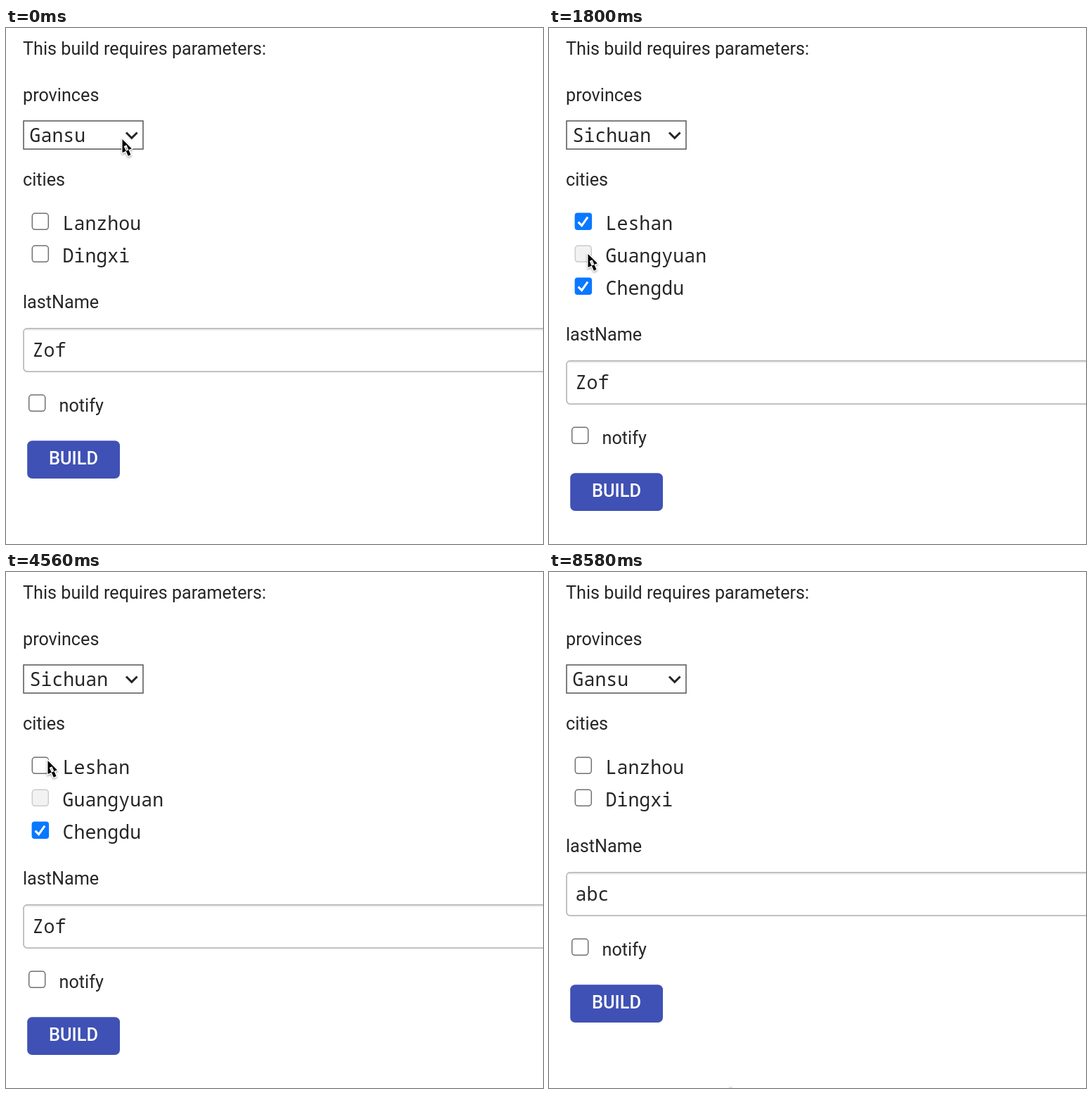
Write an HTML page with a canvas that moves like this. It is 764x733 px and loops after 8640 ms.

```html
<!DOCTYPE html>
<html lang="en">
<head>
<meta charset="utf-8">
<title>Build parameters</title>
<style>
  html, body { margin: 0; width: 100%; height: 100%; overflow: hidden; background: #fff; }
  canvas { display: block; }
</style>
</head>
<body>
<canvas id="stage" width="764" height="733"></canvas>
<script>
const canvas = document.getElementById('stage');
const ctx = canvas.getContext('2d');
const LOOP = 8640, STEP = 60, ROW = 46, ITEM = 41;
const LABEL = '25.2px Roboto, sans-serif';
const MONO = '26.6px "Noto Sans Mono", monospace';
const MENU = '24.4px Inter, sans-serif';
const INK = '#262626', PALE = '#f3f3f3';
const PROVINCES = ['Gansu', 'Sichuan', 'Disabled'];

// Moments of the story, in ms
const openFirst = 60, pickSichuan = 780, citiesLoaded = 1260, uncheck = 2940;
const openSecond = 3540, pickGansu = 4440, citiesBack = 4680;
const focusField = 6300, selectWord = 6420, typing = 6720, blurField = 7860;

const within = (t, a, b) => t >= a && t < b;
const clamp = (v, lo = 0, hi = 1) => Math.max(lo, Math.min(hi, v));
const ease = u => u * u * (3 - 2 * u);

function pointerAt(t) {
  let x = 165, y = 157;
  const glide = (start, end, toX, toY) => {
    const k = ease(clamp((t - start) / (end - start)));
    x += (toX - x) * k;
    y += (toY - y) * k;
  };
  glide(openFirst, 480, 100, 198);
  glide(pickSichuan, 960, 103, 241);
  glide(960, 1500, 164, 148);
  glide(1500, 1800, 55, 320);
  glide(2100, 2400, 48, 362);
  glide(2580, 2880, 52, 274);
  glide(3060, 3360, 172, 152);
  glide(openSecond, 4020, 91, 135);
  glide(4020, 4260, 72, 113);
  glide(4380, 4560, 59, 267);
  glide(4620, 5280, 84, 330);
  glide(5340, 6000, 82, 408);
  glide(6000, 6180, 82, 443);
  glide(7200, 7740, 630, 590);
  glide(7980, 8580, 258, 731);
  return [x, y];
}

function text(str, x, y, font = LABEL, color = INK) {
  ctx.font = font;
  ctx.fillStyle = color;
  ctx.fillText(str, x, y);
}

function box(x, y, w, h, r, fill, stroke, line = 1.5) {
  ctx.beginPath();
  ctx.roundRect(x, y, w, h, r);
  if (fill) { ctx.fillStyle = fill; ctx.fill(); }
  if (stroke) { ctx.strokeStyle = stroke; ctx.lineWidth = line; ctx.stroke(); }
}

// A "v" stroke with its point at x, y and arms of the given widths
function vee(x, y, left, right, slope, color, width) {
  ctx.beginPath();
  ctx.moveTo(x - left, y - left);
  ctx.lineTo(x, y);
  ctx.lineTo(x + right, y - right * slope);
  ctx.strokeStyle = color;
  ctx.lineWidth = width;
  ctx.stroke();
}

const tick = (x, y, size, color, width) => vee(x, y, size, size * 1.7, 1.4, color, width);

function checkbox(x, y, state = 'off') {
  if (state === 'on') {
    box(x, y, 24.5, 24.5, 4, '#0a78ff');
    tick(x + 10, y + 18, 5, '#fff', 3);
  } else {
    const disabled = state === 'disabled';
    box(x + .7, y + .7, 23, 23, 4, disabled ? '#f2f2f2' : '#fff', disabled ? '#cbcbcb' : '#707070');
  }
}

function select(value, busy) {
  if (busy) box(26, 133, 168, 38, 4, '#fff', '#b9b9b9', 3);
  else box(25, 132, 170, 40, 0, '#fff', '#555');
  text(value, 33.5, 162, MONO);
  vee(178.8, 156.3, 7.8, 7.8, 1, INK, 3);
}

function textField(y, value, focused, selected) {
  box(25, y, 780, 61.3, 5, '#fff', focused ? '#66afe9' : '#b8b8b8', 1.7);
  ctx.fillStyle = 'rgba(0,0,0,.07)';
  ctx.fillRect(28, y + 1, 740, 2);
  ctx.font = MONO;
  const width = ctx.measureText(value).width;
  if (selected) {
    ctx.fillStyle = '#b3d7ff';
    ctx.fillRect(37.5, y + 14, width, 33);
  }
  text(value, 37.5, y + 40, MONO);
  if (focused && !selected) {
    ctx.fillStyle = INK;
    ctx.fillRect(38.5 + width, y + 15, 1.6, 31);
  }
}

// The pop-up opens with its checked item over the select box
function menu(checked, pointerY, flash) {
  const top = 124 - ITEM * checked;
  const hover = clamp(Math.floor((pointerY - top - 9) / ITEM), 0, 2);
  ctx.save();
  ctx.shadowColor = 'rgba(0,0,0,.32)';
  ctx.shadowBlur = 30;
  ctx.shadowOffsetY = 7;
  box(10, top, 176, 140.5, 9, '#5b5b5b');
  ctx.restore();
  box(10.5, top + .5, 175, 139.5, 9, null, '#3e3e3e', 1);
  box(11.7, top + 1.7, 172.6, 137, 8, null, '#717171', 1);
  if (!flash) box(18, top + 8.5 + ITEM * hover, 159.5, 41.5, 5, '#7d7d7d');
  PROVINCES.forEach((name, i) =>
    text(name, 47.5, top + 39 + ITEM * i, MENU, name === 'Disabled' ? '#989898' : PALE));
  tick(31.5, top + 38 + ITEM * checked, 4.5, PALE, 2.2);
}

function arrow(x, y) {
  const length = 19, width = length * .7;
  const shape = new Path2D();
  shape.moveTo(0, 0);
  shape.lineTo(0, length);
  shape.lineTo(width, width);
  shape.closePath();
  const tail = new Path2D();
  tail.rect(-2, 10, 4, 15);
  shape.addPath(tail, new DOMMatrix().rotate(-24));

  ctx.save();
  ctx.translate(x + .5, y + 1);
  ctx.shadowColor = 'rgba(0,0,0,.35)';
  ctx.shadowBlur = 3;
  ctx.shadowOffsetY = 1.5;
  ctx.strokeStyle = '#fff';
  ctx.lineWidth = 2.6;
  ctx.stroke(shape);
  ctx.shadowColor = 'transparent';
  ctx.fillStyle = '#000';
  ctx.fill(shape);
  ctx.restore();
}

function iBeam(x, y) {
  ctx.beginPath();
  for (const end of [-1, 1]) {
    for (const side of [-1, 1]) {
      ctx.moveTo(x + side * 5, y + end * 12);
      ctx.quadraticCurveTo(x, y + end * 12, x, y + end * 9);
    }
  }
  ctx.moveTo(x, y - 9);
  ctx.lineTo(x, y + 9);
  ctx.moveTo(x - 3, y + 3);
  ctx.lineTo(x + 3, y + 3);
  for (const [color, width] of [['#fff', 4], ['#111', 1.8]]) {
    ctx.strokeStyle = color;
    ctx.lineWidth = width;
    ctx.stroke();
  }
}

function fieldValue(t) {
  const typed = Math.floor((t - typing) / 180) + 1;
  return typed > 0 ? 'abc'.slice(0, typed) : 'Zof';
}

function form(t) {
  const sichuan = within(t, citiesLoaded, citiesBack);
  const cities = sichuan ? ['Leshan', 'Guangyuan', 'Chengdu'] : ['Lanzhou', 'Dingxi'];
  const marks = sichuan ? [t < uncheck ? 'on' : 'off', 'disabled', 'on'] : [];
  const shift = ROW * (cities.length - 2);

  text('This build requires parameters:', 24, 38);
  text('provinces', 24, 104);
  select(PROVINCES[+within(t, pickSichuan, citiesBack)], within(t, pickSichuan, citiesLoaded));
  text('cities', 24, 224);
  cities.forEach((city, i) => {
    checkbox(36.6, 262.6 + ROW * i, marks[i]);
    text(city, 80.5, 287 + ROW * i, MONO);
  });

  ctx.save();
  ctx.translate(0, shift);
  text('lastName', 24, 398);
  textField(426.8, fieldValue(t), within(t, focusField, blurField), within(t, selectWord, typing));
  checkbox(32, 520.6);
  text('notify', 75.5, 545);
  box(30.2, 586.2, 131.8, 53.8, 7, '#3f51b5');
  text('BUILD', 61, 620, '500 25.4px Roboto, sans-serif', '#fff');
  ctx.restore();
}

function loading(t) {
  const fade = 180;
  ctx.globalAlpha = clamp(Math.min(t - pickSichuan, citiesLoaded + fade - t) / fade);
  ctx.fillStyle = 'rgba(216,216,216,.516)';
  ctx.fillRect(0, 0, canvas.width, canvas.height);
  text('LOADING', 565.5, 554, LABEL, '#8a8a8a');
  ctx.globalAlpha = 1;
}

function draw(t) {
  ctx.fillStyle = '#fff';
  ctx.fillRect(0, 0, canvas.width, canvas.height);
  form(t);
  loading(t);

  const [x, y] = pointerAt(t);
  const flashing = picked => t === picked - 2 * STEP;
  if (within(t, openFirst, pickSichuan)) menu(0, y, flashing(pickSichuan));
  if (within(t, openSecond, pickGansu)) menu(1, y, flashing(pickGansu));

  // The pointer hides while keys are pressed
  if (within(t, typing, 7260)) return;
  const overField = t > citiesBack && within(y, 380, 488);
  (overField ? iBeam : arrow)(x, y);
}

function play() {
  draw(Math.floor(performance.now() % LOOP / STEP) * STEP);
  requestAnimationFrame(play);
}
play();
</script>
</body>
</html>
```
